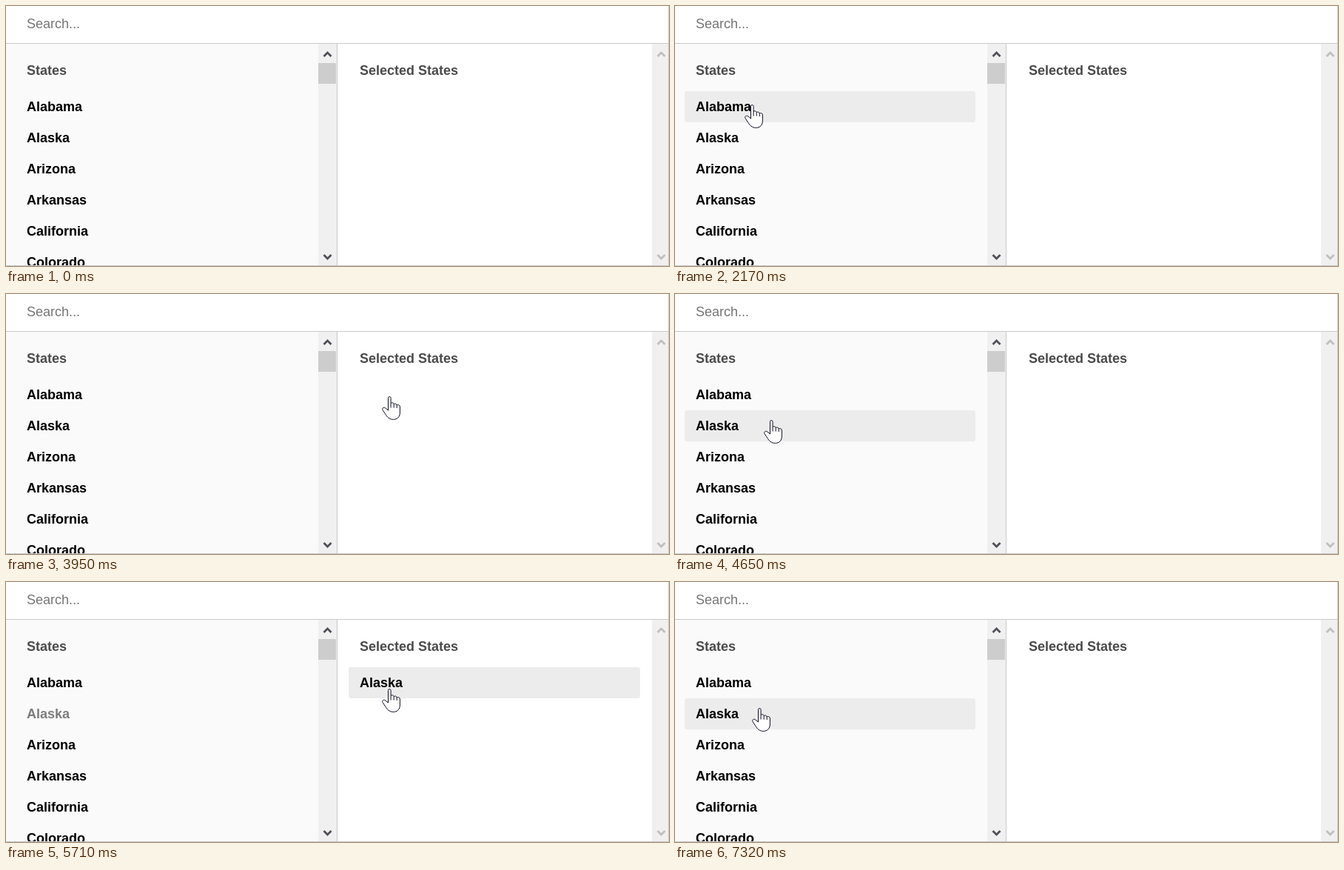
Write an HTML page that moves like this. It is 896x351 px and loops after 7.48 s.

```html
<!DOCTYPE html>
<html lang="en">
<head>
<meta charset="utf-8">
<title>State picker</title>
<style>
  html, body { margin: 0; width: 100%; height: 100%; overflow: hidden; background: #fff; }
  svg { display: block; width: 896px; height: 351px; }
  text { font: bold 18px "Liberation Sans", Arial, sans-serif; white-space: pre; }
  .search { font-weight: normal; fill: #757575; }
  .title { fill: #4a4a4a; }
  .hover { fill: #ececec; }
  .line { fill: #c8c8c8; }
  .track { fill: #f0f0f0; }
  .chevron { fill: none; stroke: #505058; stroke-width: 2.8; }
  .chevron.off { stroke: #bfbfbf; }
  .cursor { fill: #fff; stroke: #0c0c20; stroke-linejoin: round; }
</style>
</head>
<body>
<svg viewBox="0 0 896 351">
  <defs><clipPath id="lists"><rect y="51" width="896" height="299"/></clipPath></defs>
  <rect y="51" width="422" height="299" fill="#fafafa"/>
  <text class="search" x="28" y="30">Search...</text>
  <text class="title" x="28" y="93">States</text>
  <text class="title" x="478" y="93">Selected States</text>
  <g id="rows" clip-path="url(#lists)"></g>

  <rect class="track" x="422" y="51" width="25" height="299"/>
  <rect class="track" x="873" y="51" width="22" height="299"/>
  <rect x="422" y="77" width="24" height="28" fill="#cdcdcd"/>
  <path class="chevron" d="M429.5 68l5-5 5 5M429.5 336l5 5 5-5"/>
  <path class="chevron off" d="M880.5 68l5-5 5 5M880.5 336l5 5 5-5"/>
  <rect class="line" y="50" width="896" height="1"/>
  <rect class="line" y="350" width="896" height="1"/>
  <rect class="line" x="447" y="51" width="1" height="299"/>
  <rect class="line" x="895" width="1" height="351"/>

  <g id="cursor" class="cursor">
    <path id="arrow" d="M.5.8V24L6 18.9 9.4 26.5 13.3 24.8 10.1 17.3H17.4Z"/>
    <g id="hand" transform="translate(-10)">
      <path d="M8.5 19V2.5Q8.5.6 10.3.6T12.1 2.5V9.5C13 8.3 16 8.6 16.2 10.6 17.2 9.6 20 10 20.2 12
        21.5 11 24.4 11.8 24.4 14V22C24.4 28 20.5 31.4 15.5 31.4 10 31.4 7 28 5 24.5L1 18.5C0 16.5 2 14.3 4.3 15.6Z"/>
      <path fill="none" d="M12.1 9.5v6M16.2 10.6v5M20.2 12v4"/>
    </g>
  </g>
</svg>
<script>
const LOOP = 7480, STEP = 77, HOVER_LAG = 70;
const ROW_TOP = 115, ROW_HEIGHT = 42;
const STATES = ['Alabama', 'Alaska', 'Arizona', 'Arkansas', 'California', 'Colorado'];

// Click times per state; every click toggles that state.
const CLICKS = {
  Alabama: [1150, 2090, 3020, 3950],
  Alaska: [5110, 5940, 6710, 7250]
};

// The cursor enters at ENTRY, then glides to each stop in turn.
const ENTRY = { x: 525, y: 335 };
const GLIDES = [
  { start: 300, end: 760, x: 104, y: 123 },
  { start: 1463, end: 1540, x: 104, y: 128 },
  { start: 1623, end: 1700, x: 104, y: 133 },
  { start: 3100, end: 3410, x: 460, y: 133 },
  { start: 3410, end: 3720, x: 518, y: 138 },
  { start: 4340, end: 4650, x: 130, y: 170 },
  { start: 4650, end: 4800, x: 114, y: 175 },
  { start: 5180, end: 5710, x: 518, y: 144 },
  { start: 5710, end: 5780, x: 523, y: 152 },
  { start: 6250, end: 6550, x: 114, y: 170 }
];

const byId = id => document.getElementById(id);
const rows = byId('rows'), cursor = byId('cursor');
const show = (node, visible) => node.setAttribute('visibility', visible ? 'visible' : 'hidden');
const easeOut = u => 1 - (1 - u) ** 2;
const mix = (a, b, u) => a + (b - a) * u;

function addRow(x, width, index) {
  const group = document.createElementNS('http://www.w3.org/2000/svg', 'g');
  const y = ROW_TOP + ROW_HEIGHT * index;
  group.innerHTML = `<rect class="hover" x="${x}" y="${y}" width="${width}" height="${ROW_HEIGHT}" rx="3"/>
    <text x="${x + 15}" y="${y + 27}">${STATES[index]}</text>`;
  rows.append(group);
  return { group, back: group.firstChild, label: group.querySelector('text') };
}

const available = STATES.map((_, i) => addRow(13, 393, i));
const chosen = addRow(463, 394, 0);

// Motion is sampled in even steps, so the cursor jumps between eased positions.
function cursorAt(t) {
  let { x, y } = ENTRY;
  for (const { start, end, ...stop } of GLIDES) {
    if (t < start) break;
    const steps = Math.round((end - start) / STEP);
    const done = Math.floor((t - start) / (end - start) * steps + 0.1);
    const u = easeOut(Math.min(1, done / steps));
    x = Math.round(mix(x, stop.x, u));
    y = Math.round(mix(y, stop.y, u));
  }
  return { x, y };
}

const isSelected = (name, t) => (CLICKS[name] || []).filter(at => at <= t).length % 2 === 1;
const justClicked = t => Object.values(CLICKS).flat().some(at => at <= t && t < at + HOVER_LAG);

function draw(t) {
  const selected = STATES.find(name => isSelected(name, t));
  const stale = justClicked(t);
  const { x, y } = cursorAt(t);
  const visible = t >= GLIDES[0].start;
  const row = Math.floor((y - ROW_TOP) / ROW_HEIGHT);
  const overLeft = visible && !stale && x >= 13 && x < 406 && row >= 0;
  const overRight = visible && !stale && x >= 463 && x < 857 && row === 0 && !!selected;

  available.forEach((item, i) => {
    item.group.setAttribute('opacity', STATES[i] === selected ? 0.5 : 1);
    show(item.back, overLeft && row === i);
  });
  chosen.label.textContent = selected || '';
  show(chosen.back, overRight);

  const pointing = stale || overLeft || overRight;
  cursor.setAttribute('transform', `translate(${x} ${y})`);
  show(byId('hand'), visible && pointing);
  show(byId('arrow'), visible && !pointing);
}

function frame() {
  draw(performance.now() % LOOP);
  requestAnimationFrame(frame);
}
frame();
</script>
</body>
</html>
```
